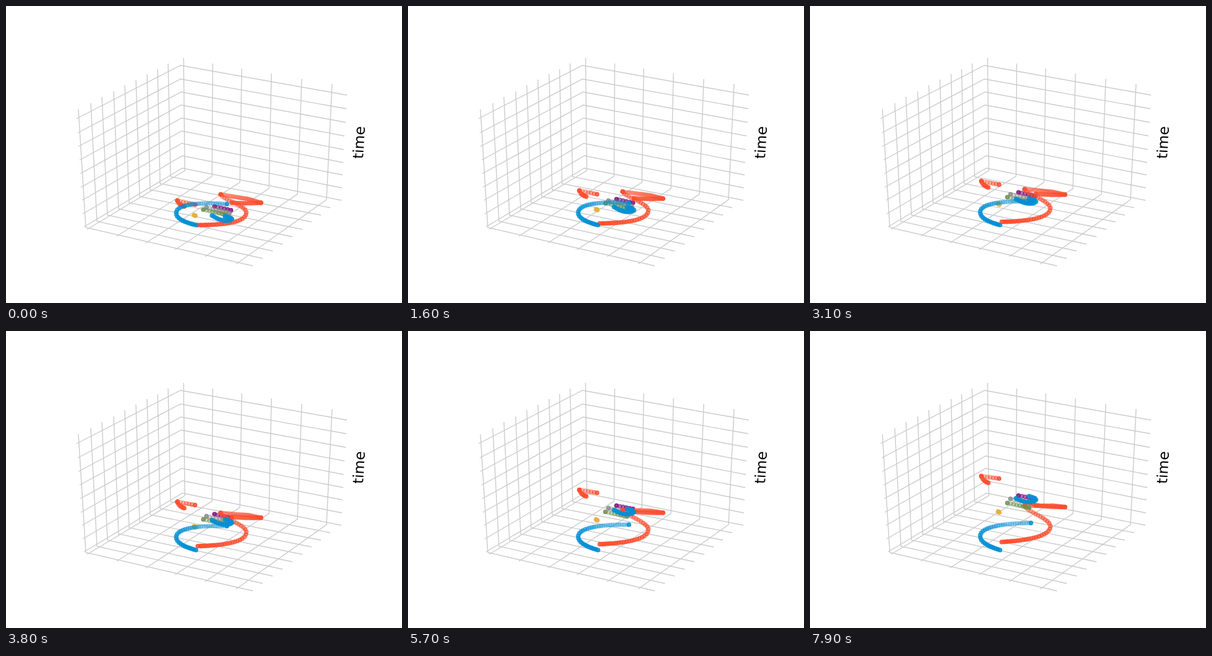
Animation of 640x480 px, one loop 8000 ms. Source, as an HTML page without scripts:

```html
<!DOCTYPE html>
<html lang="en">
<head>
<meta charset="utf-8">
<title>Strokes over time</title>
<style>
html, body { margin: 0; width: 100%; height: 100%; overflow: hidden; background: #fff; }
svg { display: block; width: 640px; height: 480px; }
.grid { fill: none; stroke: #cbcbcb; stroke-width: 1.39; }
.label { font: 23.3px "DejaVu Sans", sans-serif; text-anchor: middle; }

/* A dot's index in its stroke: tens + units */
circle { --tens: 0; }
circle:nth-child(10n+1) { --unit: 0; }
circle:nth-child(10n+2) { --unit: 1; }
circle:nth-child(10n+3) { --unit: 2; }
circle:nth-child(10n+4) { --unit: 3; }
circle:nth-child(10n+5) { --unit: 4; }
circle:nth-child(10n+6) { --unit: 5; }
circle:nth-child(10n+7) { --unit: 6; }
circle:nth-child(10n+8) { --unit: 7; }
circle:nth-child(10n+9) { --unit: 8; }
circle:nth-child(10n) { --unit: 9; }
circle:nth-child(n+11) { --tens: 10; }
circle:nth-child(n+21) { --tens: 20; }
circle:nth-child(n+31) { --tens: 30; }

/* --last: highest index, --r0/--r1: rise in px, --a0/--a1: opacity */
circle {
  --f: calc((var(--tens) + var(--unit)) / var(--last));
  --alpha: max(.3, var(--a0) + (var(--a1) - var(--a0)) * var(--f));
  --rise: calc(var(--r0) + (var(--r1) - var(--r0)) * var(--f));
  r: 3.1px;
  fill: var(--ink);
  stroke: var(--ink);
  stroke-width: 1.39px;
  fill-opacity: var(--alpha);
  stroke-opacity: var(--alpha);
  offset-path: var(--path);
  offset-distance: calc(var(--f) * 100%);
  offset-rotate: 0deg;
  animation: rise 8s steps(80, end) infinite;
}
circle:first-child, circle:last-child { --alpha: .85; }
@keyframes rise {
  from { translate: 0 0; }
  to { translate: 0 calc(var(--rise) * -1px); }
}

.blue { --ink: #008fd5; }
.red { --ink: #fc4f30; }
.gold { --ink: #e5ae38; }
.green { --ink: #6d904f; }
.gray { --ink: #8b8b8b; }
.purple { --ink: #810f7c; }

#hook { --path: path("M288 324Q279 321 277 314.5"); --last: 6; --r0: 79.5; --r1: 81; --a0: 1; --a1: .4; }
#dash { --path: path("M277 314.5L305.5 321"); --last: 6; --r0: 81; --r1: 83.5; --a0: .3; --a1: .6; }
#plum { --path: path("M337 324L363.5 330"); --last: 5; --r0: 58.7; --r1: 59.5; --a0: .5; --a1: .8; }
#ash { --path: path("M324 325.5L361 334.5"); --last: 7; --r0: 55; --r1: 55.5; --a0: .3; --a1: .8; }
#back { --path: path("M412 318Q390 319.5 365 318"); --last: 16; --r0: 34; --r1: 36.5; --a0: .6; --a1: .5; }
#out { --path: path("M347 304.5L392 312L412 318"); --last: 19; --r0: 22; --r1: 34; --a0: .3; --a1: .6; }
#bend { --path: path("M310 354C352 354 388 350 388.5 334C388 322 348 312 347 304.5"); --last: 32; --r0: 13.2; --r1: 22; --a0: 1; --a1: .4; }
#leaf { --path: path("M319 329L354 337"); --last: 7; --r0: 51.6; --r1: 52.2; --a0: .3; --a1: .8; }
#spot { --path: path("M304 338L306 339"); --last: 1; --r0: 46.8; --r1: 46.4; --a0: 1; --a1: 1; }
#curl { --path: path("M333 338.5Q346 347 356 347C364 347 373 343 354 340"); --last: 15; --r0: 69; --r1: 73.8; --a0: .7; --a1: .8; }
#arc { --path: path("M307 354C290 350 275 344 275 334.5C275 322 305 316.5 357 320"); --last: 34; --r0: 0; --r1: 9.8; --a0: 1; --a1: 0; }
</style>
</head>
<body>
<svg viewBox="0 0 640 480">
  <path class="grid" d="M287 84L289 266L131 361M334 93L333 275L179 372M381 101L378 285L226 383M429 109L425 295L273 394M478 118L471 304L322 405M527 126L518 313L372 417"/>
  <path class="grid" d="M117 167L129 358L399 420M137 157L147 348L415 408M155 147L164 338L431 396M174 138L182 328L447 385M192 128L199 318L463 373M210 119L216 308L479 361M228 110L233 297L494 349M245 102L249 287L509 338M262 93L266 276L524 326"/>
  <path class="grid" d="M114 182L282 96L551 144M116 205L282 118L550 166M117 227L283 139L549 188M119 249L283 160L547 210M120 271L284 181L546 232M121 293L284 202L545 253M123 314L284 222L544 273M124 336L285 242L543 294M126 357L285 262L542 314"/>
  <text class="label" transform="translate(578.5 221) rotate(-87)">time</text>

  <g class="red" id="hook"><circle/><circle/><circle/><circle/><circle/><circle/><circle/></g>
  <g class="red" id="dash"><circle/><circle/><circle/><circle/><circle/><circle/><circle/></g>
  <g class="purple" id="plum"><circle/><circle/><circle/><circle/><circle/><circle/></g>
  <g class="gray" id="ash"><circle/><circle/><circle/><circle/><circle/><circle/><circle/><circle/></g>
  <g class="red" id="out"><circle/><circle/><circle/><circle/><circle/><circle/><circle/><circle/><circle/><circle/>
    <circle/><circle/><circle/><circle/><circle/><circle/><circle/><circle/><circle/><circle/></g>
  <g class="red" id="back"><circle/><circle/><circle/><circle/><circle/><circle/><circle/><circle/><circle/><circle/>
    <circle/><circle/><circle/><circle/><circle/><circle/><circle/></g>
  <g class="red" id="bend"><circle/><circle/><circle/><circle/><circle/><circle/><circle/><circle/><circle/><circle/>
    <circle/><circle/><circle/><circle/><circle/><circle/><circle/><circle/><circle/><circle/>
    <circle/><circle/><circle/><circle/><circle/><circle/><circle/><circle/><circle/><circle/>
    <circle/><circle/><circle/></g>
  <g class="green" id="leaf"><circle/><circle/><circle/><circle/><circle/><circle/><circle/><circle/></g>
  <g class="gold" id="spot"><circle/><circle/></g>
  <g class="blue" id="curl"><circle/><circle/><circle/><circle/><circle/><circle/><circle/><circle/><circle/><circle/>
    <circle/><circle/><circle/><circle/><circle/><circle/></g>
  <g class="blue" id="arc"><circle/><circle/><circle/><circle/><circle/><circle/><circle/><circle/><circle/><circle/>
    <circle/><circle/><circle/><circle/><circle/><circle/><circle/><circle/><circle/><circle/>
    <circle/><circle/><circle/><circle/><circle/><circle/><circle/><circle/><circle/><circle/>
    <circle/><circle/><circle/><circle/><circle/></g>
</svg>
</body>
</html>
```
